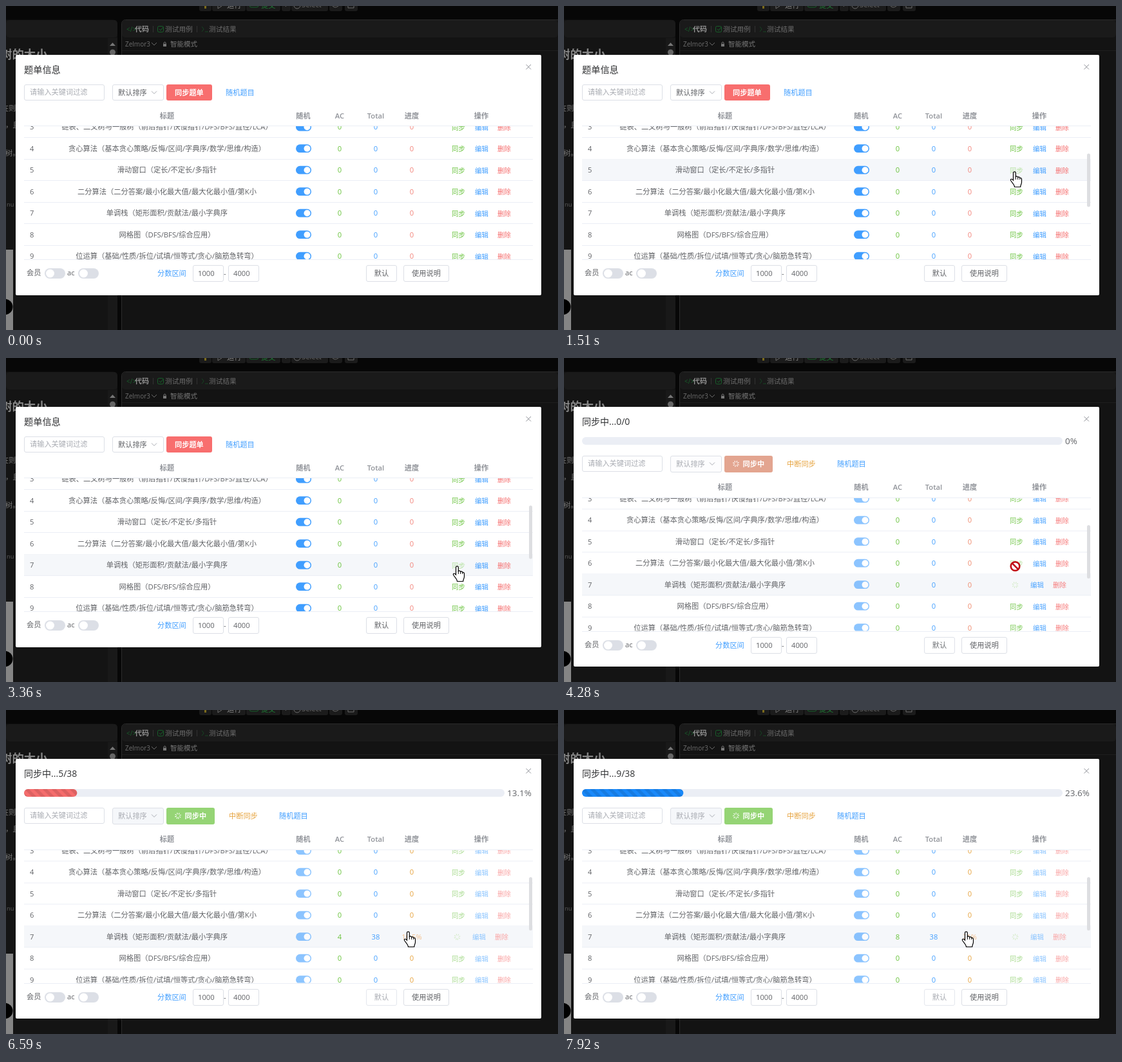
An HTML page for the animation above (7.99 s loop, 857 px wide and 504 px high).

```html
<!DOCTYPE html>
<html lang="zh">
<head>
<meta charset="utf-8">
<style>
  html, body { margin: 0; width: 100%; height: 100%; overflow: hidden; background: #080808; }
  svg { display: block; width: 857px; height: 504px; }
  text { font-family: "Open Sans", "Noto Sans CJK SC", "Noto Sans CJK", sans-serif; white-space: pre; }
</style>
</head>
<body>
<svg viewBox="0 0 857 504">
  <defs>
    <pattern id="stripes" width="14" height="14" patternUnits="userSpaceOnUse">
      <path d="M0 7L7 14H0zM0 0H7L14 7V14z" fill="#000" fill-opacity=".1"/>
    </pattern>
    <clipPath id="body"><rect x="28" y="187" width="790" height="207"/></clipPath>
  </defs>
  <g id="page"></g>
  <g id="dialog"></g>
</svg>
<script>
const LOOP = 7990, OPEN = 4210, START = 4750, STEP = 348, TOTAL = 38;
const BLUE = '#409eff', GREEN = '#67c23a', RED = '#f56c6c', ORANGE = '#e6a23c';
const INK = '#606266', MUTED = '#a8abb2';
const ROW_H = 33.5;
const TITLES = [
  '链表、二叉树与一般树（前后指针/快慢指针/DFS/BFS/直径/LCA）',
  '贪心算法（基本贪心策略/反悔/区间/字典序/数学/思维/构造）',
  '滑动窗口（定长/不定长/多指针',
  '二分算法（二分答案/最小化最大值/最大化最小值/第K小',
  '单调栈（矩形面积/贡献法/最小字典序',
  '网格图（DFS/BFS/综合应用）',
  '位运算（基础/性质/拆位/试填/恒等式/贪心/脑筋急转弯）'
];
// time, x, y of the pointer tip
const MOVES = [
  [190, 738, 470], [960, 702, 303], [1030, 702, 301], [1510, 699.5, 258], [2240, 699.5, 258],
  [3000, 704, 327], [3360, 700.5, 324], [4500, 700.5, 324], [5400, 624.5, 345]
];

const clamp = v => Math.max(0, Math.min(1, v));
const stageOf = t => Math.max(0, Math.floor(t / STEP));
const percent = n => Math.floor(n / TOTAL * 1000) / 10;

function blend(a, b, k) {
  const part = (c, i) => parseInt(c.slice(i, i + 2), 16);
  return `rgb(${[1, 3, 5].map(i => Math.round(part(a, i) + (part(b, i) - part(a, i)) * k))})`;
}

// y is the vertical middle of the text
const text = (x, y, str, fill = INK, size = 11.2, extra = '') =>
  `<text x="${x}" y="${y + size * .36}" fill="${fill}" font-size="${size}" ${extra}>${str}</text>`;
const mid = (x, y, str, fill, size, extra = '') => text(x, y, str, fill, size, 'text-anchor="middle" ' + extra);
const rect = (x, y, w, h, fill, r = 0, extra = '') =>
  `<rect x="${x}" y="${y}" width="${w}" height="${h}" rx="${r}" fill="${fill}" ${extra}/>`;
const line = (d, stroke, w = 1, extra = '') =>
  `<path d="${d}" fill="none" stroke="${stroke}" stroke-width="${w}" ${extra}/>`;
const box = (x, y, w, h, fill = '#fff', stroke = '#dcdfe6') =>
  rect(x + .5, y + .5, w - 1, h - 1, fill, 2.5, `stroke="${stroke}"`);
const dot = (x, y, r, fill) => `<circle cx="${x}" cy="${y}" r="${r}" fill="${fill}"/>`;
const chevron = (x, y, color) => line(`M${x - 4} ${y - 2}l4 4l4-4`, color);
const shifted = (dy, content) => `<g transform="translate(0 ${dy})">${content}</g>`;

const spinner = (x, y, color, t) =>
  `<circle r="3.5" fill="none" stroke="${color}" stroke-width="2.8" stroke-dasharray="1 1.75"
    transform="translate(${x} ${y}) rotate(${t * .18})"/>`;

function drawPage() {
  const dim = '#6c6c6c', green = '#17602a';
  return rect(0, 0, 857, 504, '#070707') +
    [[300, 19], [320, 52], [373, 53], [428, 14], [443, 57], [502, 20], [526, 20]]
      .map(([x, w]) => rect(x, -12, w, 20, '#1b1b1b', 3)).join('') +
    rect(308, 0, 3, 4, '#7a6a1c') + line('M329 -4l6 4l-6 4z', dim) +
    text(343, -1, '运行', '#888') + rect(378, -6, 14, 8, 'none', 3, `stroke="${green}"`) +
    text(396, -1, '提交', '#1e7a34') + line('M437 -3l-3 4', dim) +
    `<circle cx="452" cy="-1" r="5" fill="none" stroke="${dim}"/>` + text(459, -2, 'Select', dim) +
    line('M507 0q4 4 9 0M531 -5V3H540V-4', dim) +
    rect(-6, 21.5, 179, 500, '#141414', 6) + rect(0, 22, 173, 27, '#1a1a1a', 5) +
    rect(158, 50, 15, 454, '#191919') + `<path d="M161 62l4.5-5l4.5 5z" fill="#777"/>` + dot(165.5, 72, 4.5, '#666') +
    rect(179.5, 21.5, 690, 500, '#131313', 6, 'stroke="#2b2b2b"') +
    rect(180, 22, 677, 27, '#1a1a1a', 5) + line('M180 69.5H857', '#1f1f1f') +
    text(-9, 75, '树的大小', '#858585', 18.4, 'font-weight="700"') +
    text(-7, 159, '在则', '#777') + text(-1, 185, '，且', '#777') + text(-1, 229, '树。', '#777') +
    text(1, 309, 'nu', '#555', 9.6, 'style="font-family:\'Noto Sans Mono\',monospace"') +
    rect(0, 379, 11, 125, '#858585') + dot(-2, 468, 12.5, '#000') +
    text(187, 36, '&lt;/&gt;', green, 10) + text(200, 36, '代码', '#909090', 11, 'font-weight="700"') +
    line('M228.5 31V41M296.5 31V41', '#333') +
    rect(235.5, 31.5, 9, 9, 'none', 2, `stroke="${green}"`) + line('M238 36l2 2l4-5', green) +
    text(247, 36, '测试用例', dim, 10.7) + line('M304 32l3 4l-3 4M309 40h5', '#164522') +
    text(315, 36, '测试结果', dim, 10.7) +
    text(185, 59.5, 'Zelmor3', dim, 10) + chevron(230, 59, dim) +
    rect(244, 59, 5, 4, '#777') + line('M245 59v-2q1.5-2 3 0v2', '#777') +
    text(255, 59.5, '智能模式', '#777', 10.5);
}

function pointerAt(t) {
  if (t < MOVES[0][0]) return null;
  const i = MOVES.findIndex(m => m[0] > t);
  if (i < 0) return MOVES.at(-1).slice(1);
  const [t0, x0, y0] = MOVES[i - 1], [t1, x1, y1] = MOVES[i];
  let k = (t - t0) / (t1 - t0);
  k = k * k * (3 - 2 * k);
  return [x0 + (x1 - x0) * k, y0 + (y1 - y0) * k];
}

function drawPointer([x, y], kind) {
  const shapes = {
    arrow: '<path d="M0 0V16l3.7-3.5l2.5 5.7l2.4-1l-2.5-5.5H11z" fill="#fff" stroke="#000"/>',
    hand: `<path d="M-2 1.5C-2-.7 1.8-.7 1.8 1.5V7.5C3 6.5 5 7 5.2 8.5C6.5 7.5 8 8 8.3 9.5
      C9.7 9 11 9.8 11 11.5V16C11 19 9.2 20 9.2 23.5H0C0 20-3.5 17.5-5.8 13.5
      C-7 11.3-4.5 10-2 13z" fill="#fff" stroke="#000" stroke-width="1.2"/>
      <path d="M1.8 7.5V12M5.2 8.5V12M8.3 9.5V12" stroke="#000"/>`,
    blocked: '<g fill="#fff" stroke="#c00d12" stroke-width="2.6"><circle r="6.8"/><path d="M-4.8-4.8L4.8 4.8"/></g>'
  };
  return `<g transform="translate(${x} ${y})">${shapes[kind]}</g>`;
}

function drawRow(i, s) {
  const y = 188 + i * ROW_H, busy = s.open && i === 4, shift = busy ? 4 : 0;
  const done = busy ? s.solved : 0;
  const fade = (a, b) => blend(a, b, s.mix);
  const over = s.link && i === s.under;
  const syncColor = over ? '#b3e19d' : fade(GREEN, '#a4d98a');
  return (i === s.hover ? rect(28, y - ROW_H / 2, 790, ROW_H, '#f5f7fa') : '') +
    line(`M28 ${Math.floor(y + ROW_H / 2) + .5}H818`, '#ebeef5') +
    text(37, y, i + 3) + mid(250, y, TITLES[i], INK, 11.25) +
    `<g opacity="${s.open ? .6 : 1}">${rect(450, y - 6.2, 24, 12.8, BLUE, 6.4)}${dot(467.5, y + .2, 5, '#fff')}</g>` +
    mid(518, y, done, GREEN) + mid(574, y, busy && s.t >= START ? TOTAL : 0, BLUE) +
    mid(630, y, done ? percent(done) + '%' : 0, done ? '#f3c08f' : fade('#f28379', ORANGE)) +
    (busy ? spinner(700.5, y + .5, '#d3eac6', s.t) : text(692, y + 1, '同步', syncColor, 10.4)) +
    text(728 - shift, y + 1, '编辑', fade(BLUE, '#8cc5ff'), 10.4) +
    text(763 - shift, y + 1, '删除', fade(RED, '#f9a3a3'), 10.4);
}

function drawProgress(t, count) {
  const w = Math.max(0, (t - 5131) / STEP) * 746 / TOTAL;
  const pct = percent(count);
  const flow = (w - 14) * (t % 3000 / 1500 - 1);
  document.getElementById('stripes').setAttribute('patternTransform', `translate(${28 + flow} 123)`);
  return rect(28, 123, 746, 12, '#ebeef5', 6) +
    rect(28, 123, w, 12, pct < 20 ? RED : '#1989fa', 6) + rect(28, 123, w, 12, 'url(#stripes)', 6) +
    text(778, 129.5, pct + '%', INK, 13.5);
}

function drawDialog(t) {
  const open = t >= OPEN, dy = open ? 30.5 : 0, mix = clamp((t - OPEN) / 330);
  const count = stageOf(t - START), solved = stageOf(t - START - 200);
  const pos = pointerAt(t);
  // the hovered row only follows the new layout once the pointer moves again
  const rowAt = off => pos && pos[1] - off < 394 ? Math.floor((pos[1] - 188 - off) / ROW_H + .5) : -1;
  const under = rowAt(dy), hover = rowAt(t < 4500 ? 0 : dy);
  const overSync = pos && under >= 0 && pos[0] > 690 && pos[0] < 714;
  const link = overSync && Math.abs(pos[1] - dy - 188 - under * ROW_H) < 10;
  const s = { t, open, mix, solved, hover, under, link };
  const gray = blend(INK, MUTED, mix);

  const tools =
    box(28, 122, 125, 25) + text(37, 134, '请输入关键词过滤', MUTED) +
    box(165, 122, 80, open ? 26 : 25, blend('#ffffff', '#f5f7fa', mix)) +
    text(174, 134.5, '默认排序', open ? MUTED : INK) + chevron(230, 134.5, MUTED) +
    rect(249, 122, open ? 75 : 71, open ? 26 : 25, open ? blend('#f89898', '#95d475', mix) : '#f86e6e', 3) +
    (open ? spinner(267, 134.5, '#fff', t) : '') +
    text(open ? 277.5 : 262, 134.5, open ? '同步中' : '同步题单', '#fff', 11.2, 'font-weight="700"') +
    (open ? text(346, 134.5, '中断同步', ORANGE) : '') +
    text(open ? 424 : 341, 134.5, '随机题目', BLUE);

  const heads = [[250, '标题'], [461.5, '随机'], [518, 'AC'], [574, 'Total'], [630, '进度'], [738, '操作']]
    .map(([x, name]) => mid(x, 171, name, '#909399', 11.2, 'font-weight="600"')).join('');

  const table = `<g clip-path="url(#body)">${TITLES.map((_, i) => drawRow(i, s)).join('')}</g>` +
    (hover >= 0 ? rect(812, 229.5, 5, 83, '#dddee1', 2.5) : '');

  const toggle = x => rect(x, 408, 32, 16, '#dcdfe6', 8) + dot(x + 8.5, 416, 6.5, '#fff');
  const footer =
    line('M28 394.5H818', '#ebeef5') +
    text(32, 415, '会员') + toggle(60) + text(95, 415, 'ac') + toggle(112) +
    text(235, 416, '分数区间', BLUE) + box(290, 403, 48, 26) + text(298, 416, '1000') +
    text(338, 416, '-') + box(345, 403, 48, 26) + text(353, 416, '4000') +
    box(559, 403, 48, 26, '#fff', blend('#dcdfe6', '#e4e7ed', mix)) + mid(583, 416, '默认', gray) +
    box(617, 403, 71, 26) + mid(652.5, 416, '使用说明');

  const kind = open && overSync ? 'blocked' : link || (pos && pos[0] < 645) ? 'hand' : 'arrow';
  return rect(15, 76, 816, open ? 404 : 374, '#fff', 2) +
    text(28, 99, open ? `同步中...${count}/${t >= START ? TOTAL : 0}` : '题单信息', '#303133', open ? 14 : 14.2) +
    line('M807.5 91l7.5 7.5M815 91l-7.5 7.5', '#909399') +
    (open ? drawProgress(t, count) : '') +
    shifted(Math.floor(dy), tools + heads) +
    shifted(dy, table) +
    shifted(Math.ceil(dy), line('M28 186.5H818', '#ebeef5') + footer) +
    (pos ? drawPointer(pos, kind) : '');
}

const dialog = document.getElementById('dialog');
document.getElementById('page').innerHTML = drawPage();
const begin = performance.now();
function tick() {
  dialog.innerHTML = drawDialog((performance.now() - begin) % LOOP);
  requestAnimationFrame(tick);
}
tick();
</script>
</body>
</html>
```
